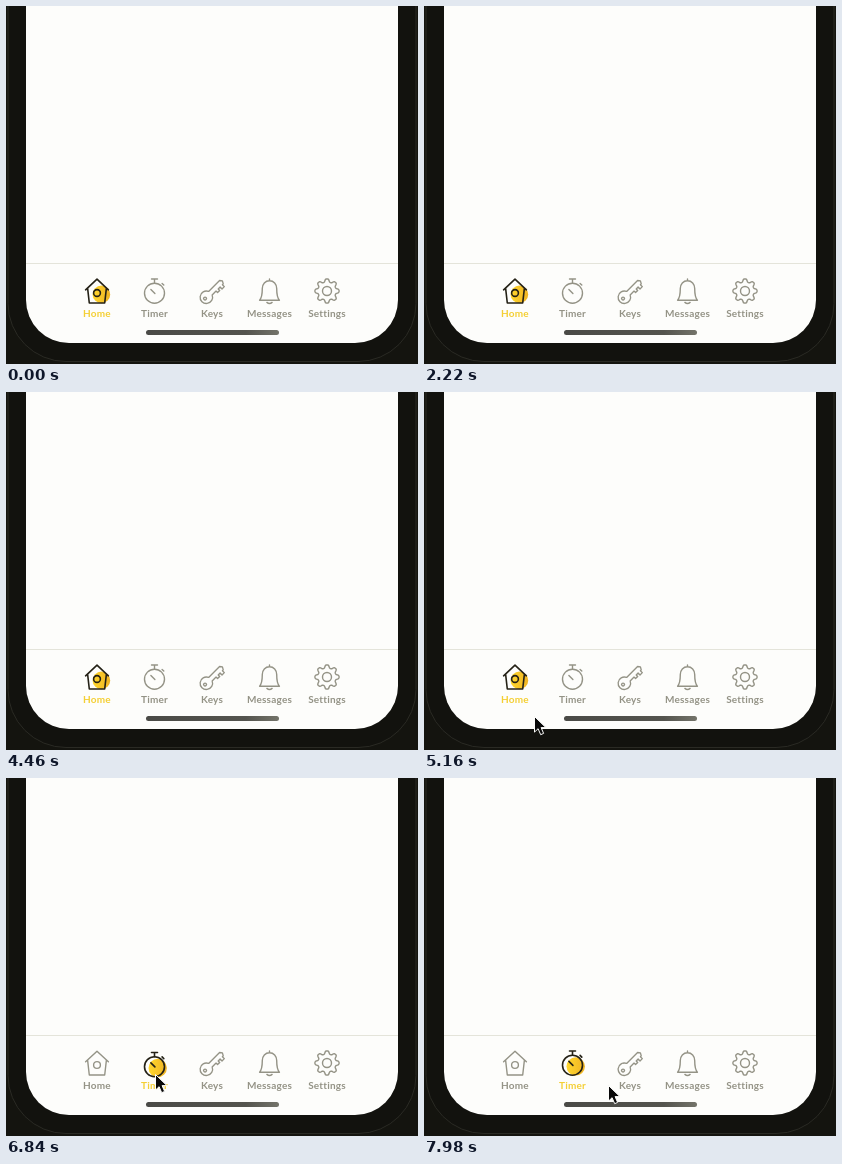
These frames come from a looping animation (412x358 px, 8 s). An HTML page:

```html
<!DOCTYPE html>
<html lang="en">
<head>
<meta charset="utf-8">
<title>Tab bar</title>
<style>
  html, body { margin: 0; width: 100%; height: 100%; overflow: hidden; background: #12120e; }
  svg { display: block; width: 100vw; height: 100vh; }
  text {
    font: 700 10px Lato, sans-serif;
    text-anchor: middle;
    letter-spacing: .2px;
    font-variant-ligatures: none;
  }
  .line { fill: none; stroke-linecap: round; stroke-linejoin: round; }
</style>
</head>
<body>
<svg viewBox="0 0 412 358">
  <defs>
    <linearGradient id="bar">
      <stop offset="0" stop-color="#4a4a46"/>
      <stop offset=".75" stop-color="#54544e"/>
      <stop offset="1" stop-color="#74746a"/>
    </linearGradient>
    <linearGradient id="sun">
      <stop offset="0" stop-color="#ffd72c"/>
      <stop offset="1" stop-color="#efb325"/>
    </linearGradient>
  </defs>
  <rect width="412" height="358" fill="#14140f"/>
  <rect x="2" y="-100" width="408" height="455.5" rx="58" fill="#12120e" stroke="#2a2a24"/>
  <rect x="20" y="-100" width="372" height="437" rx="43" fill="#fdfdfb"/>
  <path d="M20 257.5H392" stroke="#e4e4da"/>
  <g id="tabs"></g>
  <rect x="140" y="324" width="133" height="5" rx="2.5" fill="url(#bar)"/>
  <path id="cursor" d="M0 0V15.6L3.6 12.2L6.2 18.2L9.1 16.9L6.6 11.1H11.4Z" fill="#080808" stroke="#fdfdfb"/>
</svg>
<script>
const LOOP = 8000, SWITCH = 6700;
const GREY = [148, 147, 134], DARK = [36, 33, 22], YELLOW = [244, 207, 52];

// Icons are drawn around the middle of their tab.
function gear() {
  let d = '';
  for (let i = 0; i < 96; i++) {
    const a = i / 96 * Math.PI * 2;
    const r = 10.6 + 1.6 * Math.tanh(1.7 * Math.cos(8 * a));
    d += (i ? 'L' : 'M') + (r * Math.sin(a)).toFixed(2) + ' ' + (-r * Math.cos(a)).toFixed(2);
  }
  return `<path d="${d}Z"/><circle r="4.5"/>`;
}

const icons = {
  Home: '<path d="M-11.4 -1.2L0 -11.8L11.4 -1.2M-9.4 -2.8L-7.7 12H7.7L9.4 -2.8"/><circle cy="2" r="3.4"/>',
  Timer: '<circle cy="2.2" r="10"/><path d="M-3 -12H3M0 -12V-7.8M7.6 -7.6L9.3 -5.9M-3.6 -1.6L.4 2.4"/>',
  Keys: '<g transform="translate(-5.6 6.2) rotate(-45) scale(.96)"><path d="M5.9 -2.6H22L23.8 -.2L22.2 2.6H21V5.4H17.6V2.6H14.8V4.8H11.6V2.6H5.9A6.5 6.5 0 1 1 5.9 -2.6Z"/><circle cx="-2" r="1.5"/></g>',
  Messages: '<path d="M0 -12V-10.2M-9.9 9.2C-7.4 6.6 -7.2 3.4 -7.2 -2.4C-7.2 -7 -4.2 -10.2 0 -10.2S7.2 -7 7.2 -2.4C7.2 3.4 7.4 6.6 9.9 9.2ZM-2.6 11.4Q0 13.6 2.6 11.4"/>',
  Settings: gear()
};
const spots = { Home: [4.4, 3.4, 8.8], Timer: [3.2, 3.4, 9.2] };

const root = document.getElementById('tabs');
const cursor = document.getElementById('cursor');
const tabs = {};

Object.keys(icons).forEach((name, i) => {
  const x = 91 + 57.5 * i;
  const [cx, cy, r] = spots[name] || [0, 0, 0];
  root.insertAdjacentHTML('beforeend',
    `<g transform="translate(${x} 285)"><g class="icon">
      <circle class="spot" cx="${cx}" cy="${cy}" r="${r}" fill="url(#sun)"/>
      <g class="line">${icons[name]}</g></g><text y="25.7">${name}</text></g>`);
  const g = root.lastElementChild;
  const find = s => g.querySelector(s);
  tabs[name] = { icon: find('.icon'), spot: find('.spot'), line: find('.line'), label: find('text') };
  paint(name, 0, 0);
});

function mix(a, b, k) {
  return `rgb(${a.map((v, i) => Math.round(v + (b[i] - v) * k))})`;
}

function progress(t, from, to) {
  return Math.min(1, Math.max(0, (t - from) / (to - from)));
}

function paint(name, on, drop) {
  const { icon, spot, line, label } = tabs[name];
  line.setAttribute('stroke', mix(GREY, DARK, on));
  line.style.strokeWidth = 1.4 + .2 * on;
  spot.setAttribute('opacity', on);
  label.setAttribute('fill', mix(GREY, YELLOW, on));
  label.setAttribute('y', 25.7 + drop * .5);
  icon.setAttribute('transform', `translate(0 ${drop})`);
}

// Cursor stops: time, x, y
const path = [
  [5000, 106, 359], [5160, 110.5, 324.5], [5420, 123, 299], [5700, 137, 291],
  [6000, 142.5, 292.5], [6600, 149, 296.5], [6840, 149.5, 296.5], [7160, 149.5, 296.5],
  [7520, 158, 304], [7980, 184.5, 307.5], [8000, 185.5, 307.5]
];

function moveCursor(t) {
  const i = path.findIndex(p => p[0] > t);
  cursor.style.display = i > 0 ? '' : 'none';
  if (i < 1) return;
  const [a, b] = [path[i - 1], path[i]];
  const k = progress(t, a[0], b[0]);
  const at = n => a[n] + (b[n] - a[n]) * k;
  cursor.setAttribute('transform', `translate(${at(1)} ${at(2)})`);
}

function draw(t) {
  const on = progress(t, SWITCH, SWITCH + 120);
  const settle = progress(t, SWITCH, SWITCH + 400);
  paint('Home', 1 - on, 0);
  paint('Timer', on, on * 3.6 * (1 - settle) ** 2);
  moveCursor(t);
}

let start;
function tick(now) {
  start ??= now;
  draw((now - start) % LOOP);
  requestAnimationFrame(tick);
}
draw(0);
requestAnimationFrame(tick);
</script>
</body>
</html>
```
